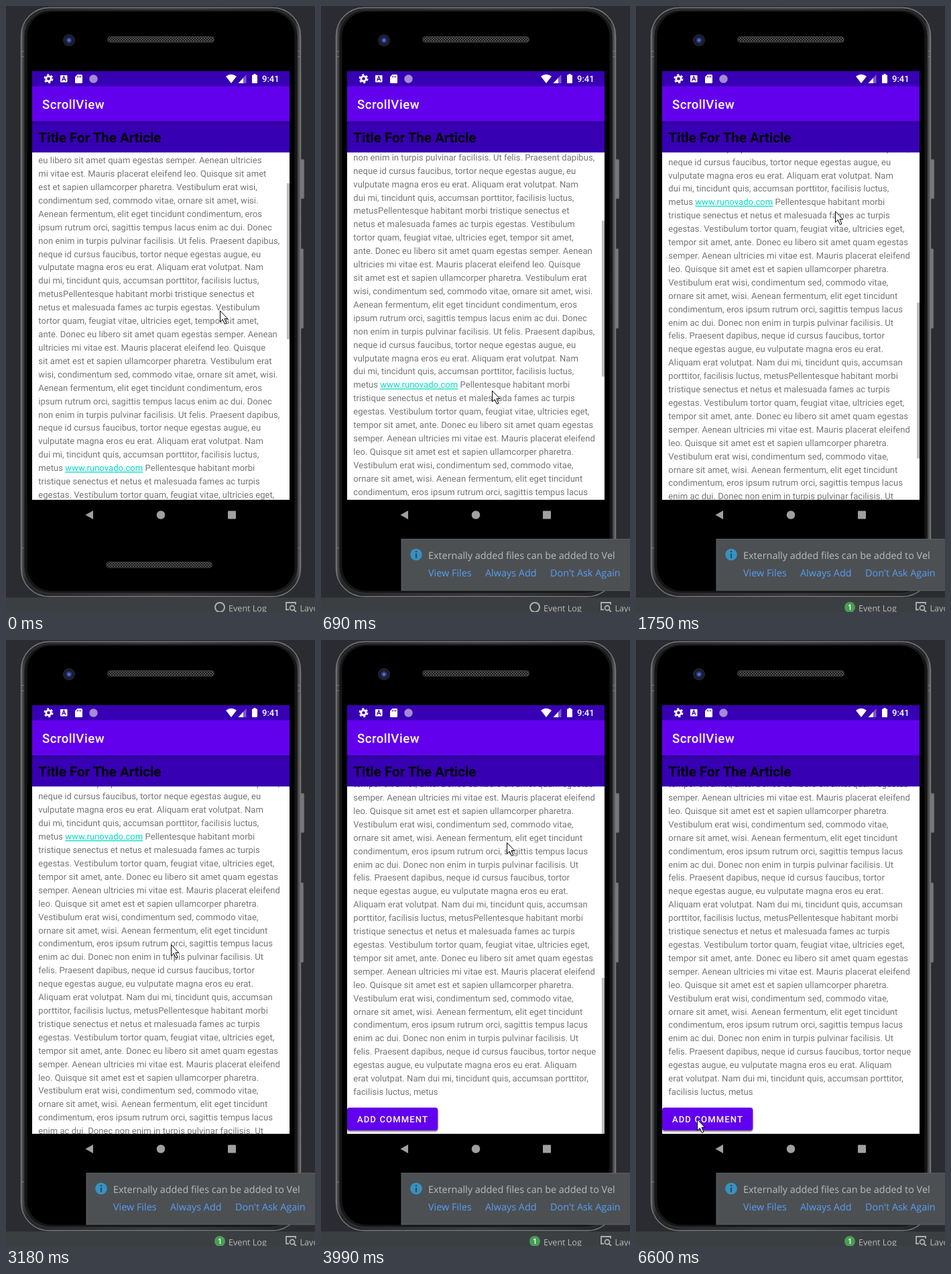
An HTML page for the animation above (8 s loop, 461 by 902 pixels).

```html
<!DOCTYPE html>
<html lang="en">
<head>
<meta charset="utf-8">
<title>Scrolling article</title>
<style>
@property --scroll { syntax: "<number>"; inherits: true; initial-value: 0; }

html, body { margin: 0; width: 100%; height: 100%; overflow: hidden; background: #2b2c31; }
svg { display: block; width: 461px; height: 902px; text-rendering: geometricPrecision; }
.roboto { font-family: Roboto, sans-serif; }
.ide { font-family: "Open Sans", "Noto Sans", sans-serif; fill: #bbb; }
.body { font-size: 13.067px; letter-spacing: .03px; fill: #757575; white-space: pre; }
.link { fill: #03dac5; text-decoration: underline; }

.scroller, .cursor, .bar, .glow, .toast, .idle, .badge { animation: 8s step-end infinite; }
.scroller { animation-name: scroll; }
.content { transform: translateY(calc(var(--scroll) * -1px)); }
.thumb { transform: translateY(calc(var(--scroll) * .4485px)); }
.bar { animation-name: bar; }
.cursor { animation-name: cursor; }
.glow { animation-name: glow; }
.toast { animation-name: toast; }
.badge { animation-name: badge; }
.idle { animation-name: idle; }

@keyframes scroll {
  0% { --scroll: 0; }
  1.875% { --scroll: 100; }
  6.875% { --scroll: 123.8; }
  18.5% { --scroll: 245; }
  20% { --scroll: 360; }
  21.875% { --scroll: 395.8; }
  23.375% { --scroll: 395; }
  41.875% { --scroll: 465; }
  43.375%, 100% { --scroll: 532.8; }
}
@keyframes bar {
  0% { opacity: 1; }
  11.375% { opacity: .5; }
  12.875% { opacity: 0; }
  18.5% { opacity: 1; }
  28.75% { opacity: .5; }
  30.625% { opacity: 0; }
  41.875% { opacity: 1; }
  51.625% { opacity: .5; }
  53.5%, 100% { opacity: 0; }
}
@keyframes glow {
  0% { opacity: 0; }
  44.875% { opacity: .14; }
  46.375% { opacity: .1; }
  48.25% { opacity: .05; }
  49.875%, 100% { opacity: 0; }
}
@keyframes toast { 0% { opacity: 0; } 8.625%, 100% { opacity: 1; } }
@keyframes badge { 0% { opacity: 0; } 14.75%, 100% { opacity: 1; } }
@keyframes idle { 0% { opacity: 1; } 14.75%, 100% { opacity: 0; } }
@keyframes cursor {
  0% { transform: translate(319px, 453px); }
  1.875% { transform: translate(328px, 395px); }
  6.875% { transform: translate(290px, 484px); }
  8.625% { transform: translate(255px, 572px); }
  11.375% { transform: translate(252px, 580px); }
  12.875% { transform: translate(250px, 585px); }
  16.625% { transform: translate(276px, 448px); }
  18.5% { transform: translate(289px, 355px); }
  20% { transform: translate(297px, 305px); }
  28.75% { transform: translate(254px, 439px); }
  30.625% { transform: translate(232px, 536px); }
  32.5% { transform: translate(231px, 548px); }
  34% { transform: translate(231px, 556px); }
  39.75% { transform: translate(246px, 453px); }
  41.875% { transform: translate(263px, 370px); }
  43.375% { transform: translate(277px, 301px); }
  58.5% { transform: translate(240px, 390px); }
  60% { transform: translate(200px, 465px); }
  61.5% { transform: translate(179px, 493px); }
  69% { transform: translate(152px, 558px); }
  70.875% { transform: translate(146px, 571px); }
  74.375% { transform: translate(134px, 615px); }
  75.875% { transform: translate(121px, 654px); }
  77.625% { transform: translate(109px, 681px); }
  79.25% { transform: translate(99px, 703px); }
  81% { transform: translate(94px, 709px); }
  82.5%, 100% { transform: translate(91px, 713px); }
}
</style>
</head>
<body>
<svg viewBox="0 0 461 902">
  <defs>
    <linearGradient id="metal">
      <stop offset="0" stop-color="#6e6f71"/>
      <stop offset=".008" stop-color="#3c3d3f"/>
      <stop offset=".02" stop-color="#242527"/>
      <stop offset=".5" stop-color="#3a3b3d"/>
      <stop offset=".98" stop-color="#242527"/>
      <stop offset=".992" stop-color="#48494b"/>
      <stop offset="1" stop-color="#6e6f71"/>
    </linearGradient>
    <linearGradient id="shade" x2="0" y2="1">
      <stop offset="0" stop-opacity=".22"/>
      <stop offset="1" stop-opacity="0"/>
    </linearGradient>
    <radialGradient id="lens">
      <stop offset="0" stop-color="#7d93e6"/>
      <stop offset=".3" stop-color="#2f3f8e"/>
      <stop offset=".6" stop-color="#14182e"/>
      <stop offset="1" stop-color="#25272b"/>
    </radialGradient>
    <pattern id="mesh" width="4" height="4" patternUnits="userSpaceOnUse">
      <path d="M0 0 4 4M4 0 0 4" stroke="#5a5a5a" stroke-width=".9"/>
    </pattern>
    <clipPath id="page"><path d="M39 218H423V735H39z"/></clipPath>
    <filter id="soft" x="-10%" y="-30%" width="120%" height="170%"><feGaussianBlur stdDeviation="1.3"/></filter>
  </defs>

  <rect width="461" height="902" fill="#2b2c31"/>

  <!-- phone -->
  <g fill="#77787a" stroke="#3f4042" stroke-width=".8">
    <rect x="439" y="228" width="6" height="59" rx="1.5"/>
    <rect x="439" y="361" width="5" height="119" rx="1.5"/>
  </g>
  <rect x="22.5" y="2.5" width="417" height="876.5" rx="42" fill="url(#metal)" stroke="#77787b" stroke-width="1.4"/>
  <path d="M23 67.500h8M23 75.500h8M431 67.500h8M431 75.500h8M23 806.500h8M431 806.500h8" stroke="#77787b"/>
  <rect x="27" y="6" width="408" height="868" rx="39" fill="#161617" stroke="#3b3c3e" stroke-width=".8"/>
  <rect x="31.500" y="8.500" width="399" height="862" rx="36"/>
  <circle cx="94" cy="51" r="9" fill="url(#lens)"/>
  <g fill="#171717" stroke="#3a3a3a">
    <rect x="151.500" y="45.500" width="159" height="8.500" rx="4"/>
    <rect x="149.500" y="827.500" width="158" height="8.500" rx="4"/>
  </g>
  <g fill="url(#mesh)">
    <rect x="152" y="46" width="158" height="7.500" rx="3.500"/>
    <rect x="150" y="828" width="157" height="7.500" rx="3.500"/>
  </g>

  <!-- status bar and headings -->
  <path d="M39 97H423V218H39z" fill="#3700b3"/>
  <path d="M39 119.500H423V171.700H39z" fill="#6200ee"/>
  <path d="M39 171.700H423V177H39z" fill="url(#shade)"/>
  <g fill="#fff">
    <circle cx="63.500" cy="108.300" r="5.900" fill="none" stroke="#fff" stroke-width="2.200" stroke-dasharray="3.090"/>
    <circle cx="63.500" cy="108.300" r="3.700" fill="none" stroke="#fff" stroke-width="2.800"/>
    <rect x="81" y="103" width="10.500" height="10.500" rx="1"/>
    <path d="M83.500 111.500 86.300 104.800 89 111.500M84.700 109.300H87.900" fill="none" stroke="#3700b3" stroke-width="1.300"/>
    <path d="M106.500 102H112.500Q114 102 114 103.500V113.500Q114 115 112.500 115H104.500Q103 115 103 113.500V105.500z"/>
    <path d="M106.500 104v2.500M109 104v2.500M111.500 104v2.500" stroke="#3700b3"/>
    <circle cx="130.500" cy="108.500" r="6.200" fill="#a68ad6"/>
    <path d="M328 104.800Q336 98.800 344 104.800L336 115z"/>
    <path d="M358.500 102V115H346.500z" opacity=".35"/>
    <path d="M354 107V115H346.500z"/>
    <path d="M369.500 101h3v1.500H374q1 0 1 1V114q0 1-1 1H368q-1 0-1-1V103.500q0-1 1-1h1.500z"/>
  </g>
  <g class="roboto">
    <text x="382" y="113" font-size="13.067" font-weight="500" fill="#fff">9:41</text>
    <text x="53.900" y="153" font-size="18.667" font-weight="500" letter-spacing=".5" fill="#fff">ScrollView</text>
    <text x="48.300" y="203" font-size="20.530" font-weight="700">Title For The Article</text>
  </g>

  <!-- article -->
  <path d="M39 218H423V735H39z" fill="#fff"/>
  <g clip-path="url(#page)" class="roboto">
    <g class="scroller">
      <g class="content">
        <g id="article" class="body"></g>
        <g transform="translate(39 1228.800)">
          <rect y="2" width="135.300" height="34" rx="3.700" opacity=".45" filter="url(#soft)"/>
          <rect width="135.300" height="34" rx="3.700" fill="#6200ee"/>
          <text x="14.930" y="21.700" font-size="13.067" font-weight="500" letter-spacing="1.120" fill="#fff">ADD COMMENT</text>
        </g>
      </g>
      <g class="bar"><rect class="thumb" x="419" y="264" width="4" height="232" fill="#bcbcbc"/></g>
    </g>
    <path class="glow" d="M39 735Q231 669 423 735z" fill="#6200ee"/>
  </g>

  <!-- navigation -->
  <g fill="#a0a0a0">
    <path d="M118.500 757.500 130 751V764z"/>
    <circle cx="231" cy="757.500" r="6.300"/>
    <rect x="331" y="751.500" width="12" height="12" rx=".8"/>
  </g>

  <!-- editor bar and notification -->
  <path d="M0 881H461V902H0z" fill="#3c3f41"/>
  <path d="M0 880.500H461" stroke="#323435"/>
  <g class="ide" font-size="12.600">
    <text x="332" y="900.500">Event Log</text>
    <text x="438.500" y="900.500">Layout</text>
  </g>
  <g fill="none" stroke="#afb1b3" stroke-width="1.800">
    <path d="M422 898.500H418V888H432V891"/>
    <circle cx="427" cy="896" r="3.500"/>
    <path d="M429.500 898.500 433 902"/>
    <circle class="idle" cx="319" cy="895" r="7" stroke-width="2"/>
  </g>
  <g class="badge">
    <circle cx="319" cy="895" r="8" fill="#499c54"/>
    <text class="ide" x="319" y="899.300" font-size="11.500" font-weight="600" text-anchor="middle" style="fill:#fff">1</text>
  </g>
  <g class="toast ide" font-size="14.400">
    <rect x="120" y="793.500" width="350" height="76.500" fill="#4d5052" stroke="#5d6062"/>
    <circle cx="142" cy="816.500" r="8.800" fill="#3592c4"/>
    <path d="M142 811v2.200M142 815v6.800" stroke="#3f4547" stroke-width="2.200"/>
    <text x="160" y="823">Externally added files can be added to Vel</text>
    <g style="fill:#589df6">
      <text x="160" y="849">View Files</text>
      <text x="245" y="849">Always Add</text>
      <text x="342" y="849">Don't Ask Again</text>
    </g>
  </g>

  <path class="cursor" d="M.5.7V17L4.300 13.500 7.300 20.400 9.900 19.300 7 12.500H11.800z" fill="#fff" stroke="#000"/>
</svg>
<script>
const dapibus = `ipsum rutrum orci, sagittis tempus lacus enim ac dui. Donec
non enim in turpis pulvinar facilisis. Ut felis. Praesent dapibus,
neque id cursus faucibus, tortor neque egestas augue, eu
vulputate magna eros eu erat. Aliquam erat volutpat. Nam
dui mi, tincidunt quis, accumsan porttitor, facilisis luctus,`;

const senectus = `tristique senectus et netus et malesuada fames ac turpis
egestas. Vestibulum tortor quam, feugiat vitae, ultricies eget,
tempor sit amet, ante. Donec eu libero sit amet quam egestas
semper. Aenean ultricies mi vitae est. Mauris placerat eleifend
leo. Quisque sit amet est et sapien ullamcorper pharetra.
Vestibulum erat wisi, condimentum sed, commodo vitae,
ornare sit amet, wisi. Aenean fermentum, elit eget tincidunt
condimentum, eros ipsum rutrum orci, sagittis tempus lacus
enim ac dui. Donec non enim in turpis pulvinar facilisis. Ut`;

const article = `eu libero sit amet quam egestas semper. Aenean ultricies
mi vitae est. Mauris placerat eleifend leo. Quisque sit amet
est et sapien ullamcorper pharetra. Vestibulum erat wisi,
condimentum sed, commodo vitae, ornare sit amet, wisi.
Aenean fermentum, elit eget tincidunt condimentum, eros
${dapibus}
metusPellentesque habitant morbi tristique senectus et
netus et malesuada fames ac turpis egestas. Vestibulum
tortor quam, feugiat vitae, ultricies eget, tempor sit amet,
ante. Donec eu libero sit amet quam egestas semper. Aenean
ultricies mi vitae est. Mauris placerat eleifend leo. Quisque
sit amet est et sapien ullamcorper pharetra. Vestibulum erat
wisi, condimentum sed, commodo vitae, ornare sit amet, wisi.
Aenean fermentum, elit eget tincidunt condimentum, eros
${dapibus}
metus <tspan class="link">www.runovado.com</tspan> Pellentesque habitant morbi
${senectus}
felis. Praesent dapibus, neque id cursus faucibus, tortor
neque egestas augue, eu vulputate magna eros eu erat.
Aliquam erat volutpat. Nam dui mi, tincidunt quis, accumsan
porttitor, facilisis luctus, metusPellentesque habitant morbi
${senectus}
felis. Praesent dapibus, neque id cursus faucibus, tortor neque
egestas augue, eu vulputate magna eros eu erat. Aliquam
erat volutpat. Nam dui mi, tincidunt quis, accumsan porttitor,
facilisis luctus, metus`;

const firstBaseline = 234.2, lineHeight = 19.911;
document.getElementById("article").innerHTML = article.split("\n")
  .map((line, i) => `<text x="48.3" y="${firstBaseline + i * lineHeight}">${line}</text>`)
  .join("");
</script>
</body>
</html>
```
